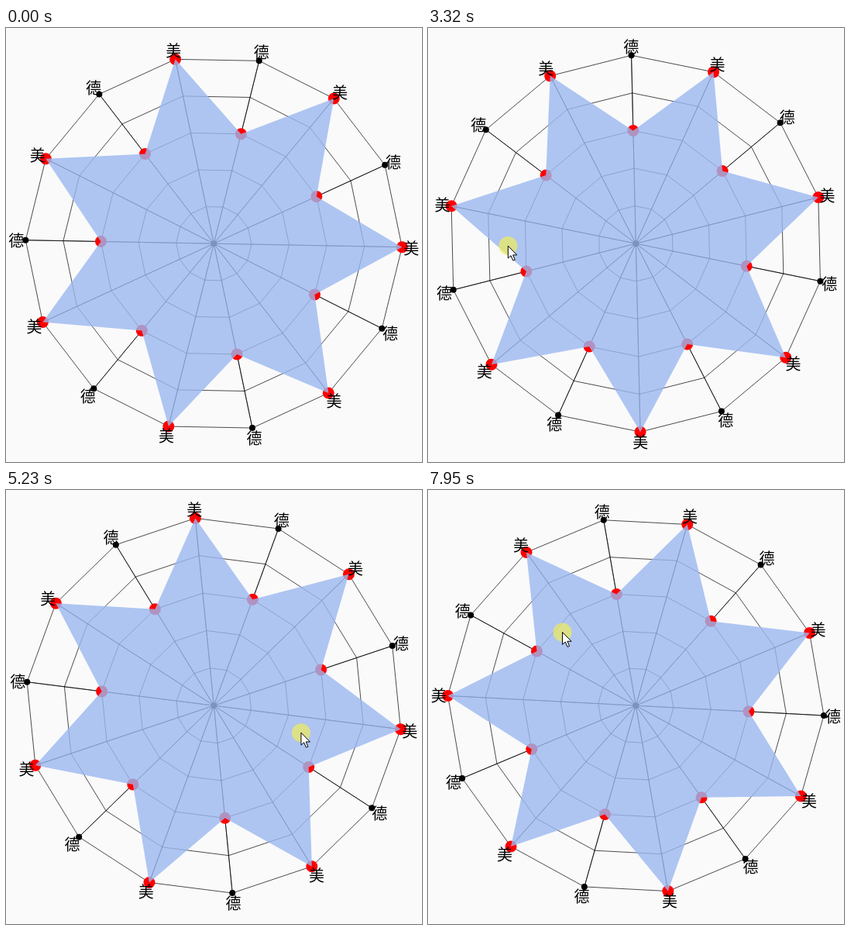
Write an HTML page with a canvas that moves like this. It is 537x560 px and loops after 8 s.

```html
<!DOCTYPE html>
<html lang="zh">
<head>
<meta charset="utf-8">
<style>
  html, body { margin: 0; width: 100%; height: 100%; overflow: hidden; background: #fafafa; }
  canvas { display: block; }
</style>
</head>
<body>
<canvas id="stage" width="537" height="560"></canvas>
<script>
const ctx = document.getElementById('stage').getContext('2d');
const CX = 268.3, CY = 278.2, R = 243, SIDES = 14, RINGS = 5, LOOP = 8000;
const ARROW = new Path2D('M0 0V16L3.7 12.6L6.5 19L9 18L6.3 11.8H11.5Z');

// Key poses: time (ms), chart turn (deg), pointer angle (deg), pointer distance
const POSES = [
  [260, 1.06, 58, 277],
  [1130, 1.06, -12, 183],
  [1330, 9.55, 2, 192],
  [1990, 90.45, 86, 143],
  [3320, 191.5, 179, 165],
  [4780, 327.1, 329, 119],
  [6030, 438.5, 463, 116],
  [6820, 390, 398, 117],
  [7680, 390, 285, 138],
  [7950, 337.3, 225, 134]
];

const mix = (a, b, p) => a.map((v, i) => v + (b[i] - v) * p);

function polar(deg, r) {
  const a = deg * Math.PI / 180;
  return [CX + r * Math.cos(a), CY + r * Math.sin(a)];
}

// A drag swings the pointer around the centre; an idle pointer moves straight.
function poseAt(t) {
  const i = POSES.findIndex(k => k[0] > t);
  const b = POSES.at(i), a = i > 0 ? POSES[i - 1] : b;
  const p = a === b ? 0 : (t - a[0]) / (b[0] - a[0]);
  const [, turn, angle, dist] = mix(a, b, p);
  const idle = a[1] === b[1];
  const tip = idle ? mix(polar(a[2], a[3]), polar(b[2], b[3]), p) : polar(angle, dist);
  return { turn, tip };
}

function dot([x, y], r, color) {
  ctx.fillStyle = color;
  ctx.beginPath();
  ctx.arc(x, y, r, 0, 2 * Math.PI);
  ctx.fill();
}

function trace(points) {
  ctx.beginPath();
  points.forEach(p => ctx.lineTo(...p));
  ctx.closePath();
}

function drawChart(turn) {
  const angles = Array.from({ length: SIDES }, (_, i) => turn + i * 360 / SIDES);
  const values = angles.map((a, i) => polar(a, i % 2 ? R * 0.6 : R));

  ctx.strokeStyle = '#000';
  ctx.lineWidth = 0.7;
  for (let k = 1; k <= RINGS; k++) {
    trace(angles.map(a => polar(a, R * k / RINGS)));
    ctx.stroke();
  }
  for (const a of angles) {
    trace([[CX, CY], polar(a, R)]);
    ctx.stroke();
    dot(polar(a, R), 4, '#000');
  }
  dot([CX, CY], 4, '#000');
  values.forEach(p => dot(p, 7.5, '#f00'));

  trace(values);
  ctx.fillStyle = 'rgba(156,184,240,0.8)';
  ctx.fill();

  ctx.fillStyle = '#000';
  ctx.font = '20px "Noto Sans CJK SC", "Noto Sans CJK", sans-serif';
  ctx.textAlign = 'center';
  angles.forEach((a, i) => {
    const [x, y] = polar(a, R + 12);
    ctx.fillText(i % 2 ? '德' : '美', x, y + 8.7);
  });
}

function drawPointer([x, y]) {
  dot([x, y], 12, 'rgba(240,235,90,0.7)');
  ctx.save();
  ctx.translate(x, y);
  ctx.fillStyle = '#fff';
  ctx.lineWidth = 1;
  ctx.fill(ARROW);
  ctx.stroke(ARROW);
  ctx.restore();
}

function frame(t) {
  const { turn, tip } = poseAt(t);
  ctx.fillStyle = '#fafafa';
  ctx.fillRect(0, 0, 537, 560);
  drawChart(turn);
  if (t >= POSES[0][0]) drawPointer(tip);
}

let start;
function tick(now) {
  start ??= now;
  frame((now - start) % LOOP);
  requestAnimationFrame(tick);
}
requestAnimationFrame(tick);
</script>
</body>
</html>
```
